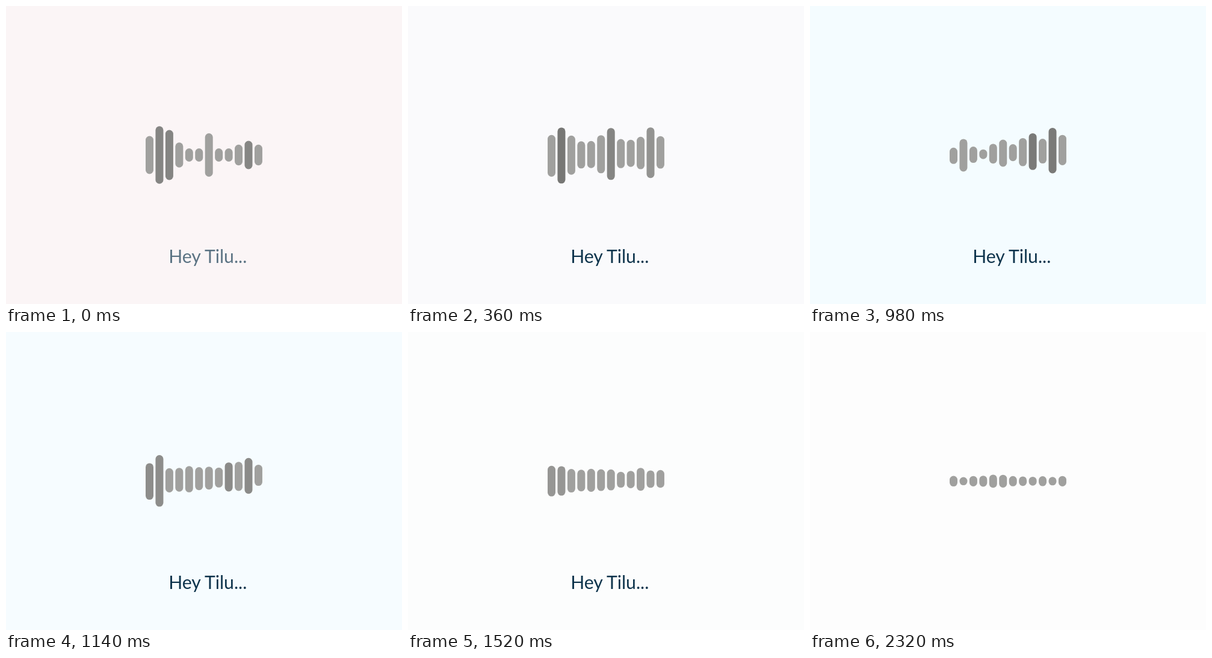
Recreate the animation shown at these times as an HTML page. Size 658 px wide and 494 px high, loop 2340 ms.

```html
<!DOCTYPE html>
<html lang="en">
<head>
<meta charset="utf-8">
<title>Voice prompt</title>
<style>
  html, body { margin: 0; width: 100%; height: 100%; overflow: hidden; }
  svg { display: block; width: 100%; height: 100%; }
  text { font: 30.2px Lato, sans-serif; fill: #0e344c; }
</style>
</head>
<body>
<svg viewBox="0 0 658 494">
  <rect id="back" width="658" height="494"/>
  <g id="bars"></g>
  <text id="label" x="270.2" y="426">Hey Tilu...</text>
</svg>
<script>
const LOOP = 2340, STEP = 20, COUNT = 12;
const LEFT = 232, PITCH = 16.45, WIDTH = 13;
const LIGHT = 160, SPEECH = 1320, QUIET = 1620;

// Each pose is a row of bell-shaped peaks above a floor.
// peak: [centre bar, height, spread, grey of its core]
const poses = [
  { t: 0, floor: 22, peaks: [[1.25, 97, 1.9, 133], [6, 72, 0.8], [10, 47, 1.8, 134]] },
  { t: 360, floor: 45, peaks: [[0.95, 93, 1.75, 119], [5.85, 87, 1.5, 133], [10, 84, 1.5, 147]] },
  { t: 680, floor: 26, peaks: [[1.15, 73, 1.1, 139], [6.15, 103, 2.2, 138], [10.15, 40, 1.6, 139]] },
  { t: 980, floor: 16, peaks: [[1, 54, 1.2], [4.9, 45, 1.6], [7.8, 62, 1.5, 122], [10.1, 76, 1.4, 122]] },
  { t: SPEECH, floor: 17, peaks: [[0.7, 129, 1.42, 119], [3.1, 68, 2.1], [6, 50, 0.9], [9.1, 57, 1.5]] },
  { t: QUIET, floor: 29, ripple: 5, peaks: [[5, 38, 1.6]] },
  { t: 1780, floor: 22, ripple: 3.5, peaks: [[5, 29, 1.6]] },
  { t: 2240, floor: 15.5, ripple: 2, peaks: [[4.4, 22, 3.2]] }
];
const skies = [
  { t: 0, rgb: [251, 245, 246] },
  { t: 360, rgb: [250, 250, 252] },
  { t: 980, rgb: [244, 252, 255] },
  { t: QUIET, rgb: [253, 253, 253] }
];

const back = document.getElementById('back');
const label = document.getElementById('label');
const group = document.getElementById('bars');
const bars = Array.from({ length: COUNT }, (_, i) => {
  const bar = document.createElementNS('http://www.w3.org/2000/svg', 'rect');
  bar.setAttribute('x', LEFT + i * PITCH);
  bar.setAttribute('width', WIDTH);
  bar.setAttribute('rx', WIDTH / 2);
  return group.appendChild(bar);
});

const clamp = v => Math.max(0, Math.min(1, v));
const mix = (a, b, p) => a + (b - a) * p;
const smooth = p => (1 - Math.cos(Math.PI * p)) / 2;
const rgb = c => `rgb(${c.map(Math.round).join(',')})`;

function span(list, t) {
  let n = list.findIndex(k => k.t > t);
  if (n < 0) n = list.length - 1;
  const a = list[n - 1], b = list[n];
  return { a, b, p: clamp((t - a.t) / (b.t - a.t)) };
}

function height({ floor, ripple = 0, peaks }, i) {
  const bells = peaks.map(([c, h, w]) => h * Math.exp(-(((i - c) / w) ** 2)));
  return Math.max(WIDTH, floor + ripple * Math.cos(2.9 * i), ...bells);
}

function grey({ peaks }, i) {
  const core = peaks.find(([c]) => Math.abs(i - c) < 0.78);
  return core?.[3] ?? LIGHT;
}

// The row rises and tips upwards to the right while the voice speaks.
function middle(t, i) {
  const speech = clamp(t / SPEECH);
  const settle = clamp((t - SPEECH) / (QUIET - SPEECH));
  const tilt = Math.sqrt(speech) * (1 - settle);
  return 247 + 1.8 * Math.sin(Math.PI * speech) + 0.3 * settle - tilt * i;
}

function draw(t) {
  const sky = span(skies, t);
  back.setAttribute('fill', rgb(sky.a.rgb.map((v, c) => mix(v, sky.b.rgb[c], sky.p))));

  const pose = span(poses, t);
  const p = smooth(pose.p);
  bars.forEach((bar, i) => {
    const h = mix(height(pose.a, i), height(pose.b, i), p);
    const g = mix(grey(pose.a, i), grey(pose.b, i), p);
    bar.setAttribute('y', middle(t, i) - h / 2);
    bar.setAttribute('height', h);
    bar.setAttribute('fill', rgb([g, g, g - 2]));
  });

  const fadeIn = clamp(0.67 + t / 450);
  const fadeOut = clamp((1860 - t) / 280);
  label.setAttribute('opacity', Math.min(fadeIn, fadeOut));
}

const start = performance.now();
function tick() {
  const t = (performance.now() - start) % LOOP;
  draw(Math.floor(t / STEP) * STEP);
  requestAnimationFrame(tick);
}
draw(0);
requestAnimationFrame(tick);
</script>
</body>
</html>
```
